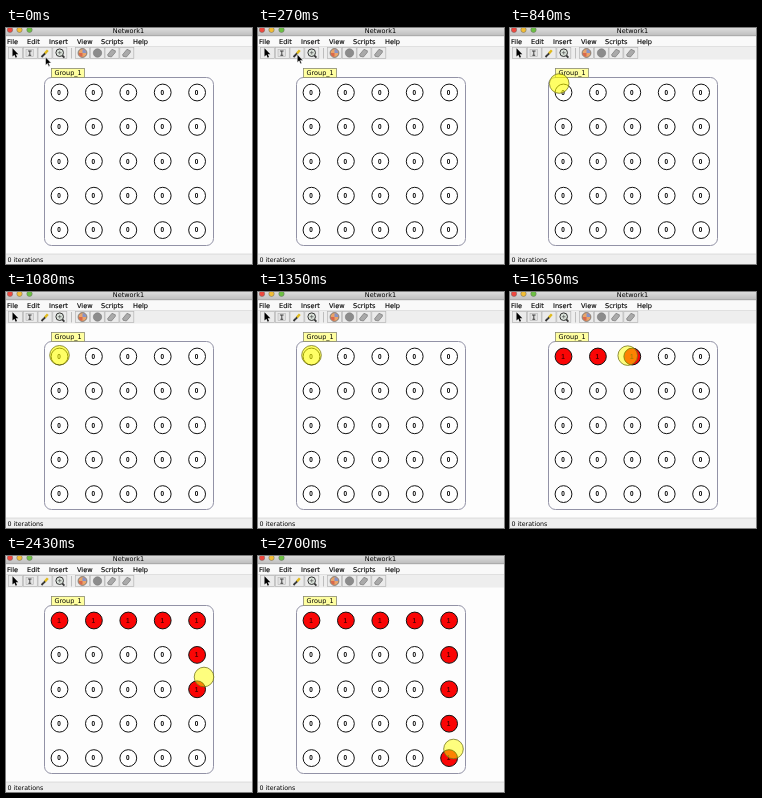
An HTML page that plays this animation: 246x236 px, repeating every 2.73 s.

```html
<!DOCTYPE html>
<html lang="en">
<head>
<meta charset="utf-8">
<title>Network1</title>
<style>
  html, body { margin: 0; width: 100%; height: 100%; overflow: hidden; background: #fdfdfd; }
  svg { display: block; width: 246px; height: 236px; }
  text { font: 6.6px "DejaVu Sans", sans-serif; fill: #000; }
  .value { font: bold 6.4px "Liberation Sans", Arial, sans-serif; text-anchor: middle; }
  .node circle { fill: #fff; stroke: #111; stroke-width: 1; }
  .node.on circle { fill: #fa0505; }
  .node.on text { fill: #500; }
</style>
</head>
<body>
<svg viewBox="0 0 246 236">
  <defs>
    <linearGradient id="bar" x2="0" y2="1">
      <stop stop-color="#dcdcdc"/><stop offset="1" stop-color="#bcbcbc"/>
    </linearGradient>
  </defs>
  <rect width="246" height="236" fill="#fdfdfd"/>

  <rect width="246" height="8" fill="url(#bar)"/>
  <path d="M0 8H246" stroke="#8a8a8a" stroke-width=".7"/>
  <g stroke="#666" stroke-width=".5">
    <circle cx="4" cy="1.8" r="2.7" fill="#f0483e"/>
    <circle cx="13.5" cy="1.8" r="2.7" fill="#f2bd35"/>
    <circle cx="23.5" cy="1.8" r="2.7" fill="#6cc043"/>
  </g>
  <text x="122.5" y="4.8" text-anchor="middle" style="font-size:6.5px">Network1</text>

  <rect y="8.4" width="246" height="10" fill="#f9f9f9"/>
  <g id="menu" stroke="#000" stroke-width=".12"></g>
  <rect y="18.5" width="246" height="13" fill="#eee"/>
  <path d="M0 18.5H246" stroke="#d4d4d4" stroke-width=".6"/>
  <g id="buttons" fill="#ebebeb" stroke="#b5b5b5" stroke-width=".7"></g>
  <path d="M65.5 20V30.5" stroke="#aaa" stroke-width=".7"/>

  <path d="M6.5 20.2V28.4L8.4 26.7L9.7 29.7L11 29.1L9.7 26.2H12.3Z"/>
  <rect x="20" y="21.5" width="7.5" height="7" fill="#e2e2e2" stroke="#aaa" stroke-width=".5"/>
  <path d="M22 23H25.6M23.8 23V27.3M22.4 27.3H25.2" stroke="#333" stroke-width=".9" fill="none"/>
  <path d="M35.5 29L39.5 25" stroke="#333" stroke-width="1.8"/>
  <path d="M39 25.4L41.8 22.3" stroke="#dfb91c" stroke-width="2.4"/>
  <path d="M56 27.2L58.4 29.6" stroke="#333" stroke-width="1.8"/>
  <circle cx="53.7" cy="24.7" r="3.8" fill="#dbe3db" stroke="#333" stroke-width="1"/>
  <path d="M53.7 22.9V26.5M51.9 24.7H55.5" stroke="#555" stroke-width=".7"/>
  <circle cx="76.5" cy="25" r="4.4" fill="#e9a46a" stroke="#666" stroke-width=".8"/>
  <path d="M76.5 21.2A3.8 3.8 0 0 1 80.2 25L76.5 25Z" fill="#8794c8"/>
  <path d="M72.8 25H76.5V28.8A3.8 3.8 0 0 1 72.8 25Z" fill="#d9694d"/>
  <circle cx="91.5" cy="25" r="4.2" fill="#8c8c8c" stroke="#777" stroke-width=".6"/>
  <g fill="#aaa" stroke="#777" stroke-width=".7">
    <path id="eraser" d="M101.7 26.6L106 21.3L109.4 22.8L109.2 24.6L105.4 29L102 28.2Z"/>
    <use href="#eraser" x="15"/>
  </g>

  <rect x="38.5" y="49.5" width="169" height="168" rx="7" fill="none" stroke="#9292a6" stroke-width="1"/>
  <rect x="45.5" y="40.5" width="33" height="9" fill="#ffffa0" stroke="#8a8a70" stroke-width=".8"/>
  <text x="48.5" y="47.2" style="font-size:6.5px">Group_1</text>
  <g id="nodes"></g>

  <rect y="226" width="246" height="10" fill="#eee"/>
  <path d="M0 226H246" stroke="#ccc" stroke-width=".6"/>
  <text x="1.5" y="233.6" style="font-size:6.3px">0 iterations</text>

  <circle id="brush" r="9.8" fill="#ff0" stroke="#77771c" stroke-width=".8"/>
  <path id="arrow" d="M0 0V8.2L1.9 6.5L3.2 9.5L4.5 8.9L3.2 6.1H5.8Z" stroke="#fff" stroke-width=".5"/>
</svg>
<script>
const LOOP = 2730, STEP = 30, PRESS = 1410;
const $ = id => document.getElementById(id);

function add(parent, tag, attrs, text) {
  const el = document.createElementNS('http://www.w3.org/2000/svg', tag);
  for (const key in attrs) el.setAttribute(key, attrs[key]);
  if (text) el.textContent = text;
  return parent.appendChild(el);
}

for (const [x, label] of [[1, 'File'], [21, 'Edit'], [43, 'Insert'], [71, 'View'], [95, 'Scripts'], [127, 'Help']])
  add($('menu'), 'text', { x, y: 15.8 }, label);

for (const x of [2.5, 17.3, 32, 46.8, 69.5, 84.3, 99, 113.8])
  add($('buttons'), 'rect', { x, y: 19.5, width: 14, height: 11 });

const nodes = [];
for (let row = 0; row < 5; row++)
  for (let col = 0; col < 5; col++) {
    const x = 53.5 + col * 34.4, y = 64.5 + row * 34.4;
    const g = add($('nodes'), 'g', { class: 'node' });
    add(g, 'circle', { cx: x, cy: y, r: 8.4 });
    const label = add(g, 'text', { class: 'value', x: x - .5, y: y + 2.3 }, '0');
    nodes.push({ x, y, g, label, hit: Infinity });
  }

// time, x, y of the pointer
const path = [
  [0, 39.5, 29], [300, 39.2, 26], [510, 39, 25], [630, 39, 26], [840, 49.2, 55.5],
  [1080, 53.5, 63.3], [1410, 53.5, 63.3], [1920, 190, 64], [2100, 191, 65],
  [2250, 195, 78], [2430, 198, 121], [2700, 195.5, 193], [2730, 195, 195]
];

function pointer(t) {
  const i = path.findIndex(p => p[0] > t);
  const [t0, x0, y0] = path[i - 1], [t1, x1, y1] = path[i];
  const k = (t - t0) / (t1 - t0);
  return [x0 + (x1 - x0) * k, y0 + (y1 - y0) * k];
}

// a node is painted once the pressed brush reaches it
for (let t = PRESS; t < LOOP; t += STEP) {
  const [x, y] = pointer(t);
  for (const n of nodes)
    if (Math.hypot(n.x - x, n.y - y) < 16) n.hit = Math.min(n.hit, t);
}

function draw(t) {
  const [x, y] = pointer(t);
  const painting = y > 31;
  const at = `translate(${x} ${y})`;
  $('brush').setAttribute('transform', at);
  $('arrow').setAttribute('transform', at);
  $('brush').style.display = painting ? '' : 'none';
  $('arrow').style.display = painting ? 'none' : '';
  $('brush').setAttribute('fill-opacity', t < PRESS ? .6 : .5);
  for (const n of nodes) {
    const on = t >= n.hit;
    n.g.classList.toggle('on', on);
    n.label.textContent = on ? '1' : '0';
  }
}

const start = performance.now();
function tick() {
  const t = (performance.now() - start) % LOOP;
  draw(Math.floor(t / STEP) * STEP);
  requestAnimationFrame(tick);
}
tick();
</script>
</body>
</html>
```
